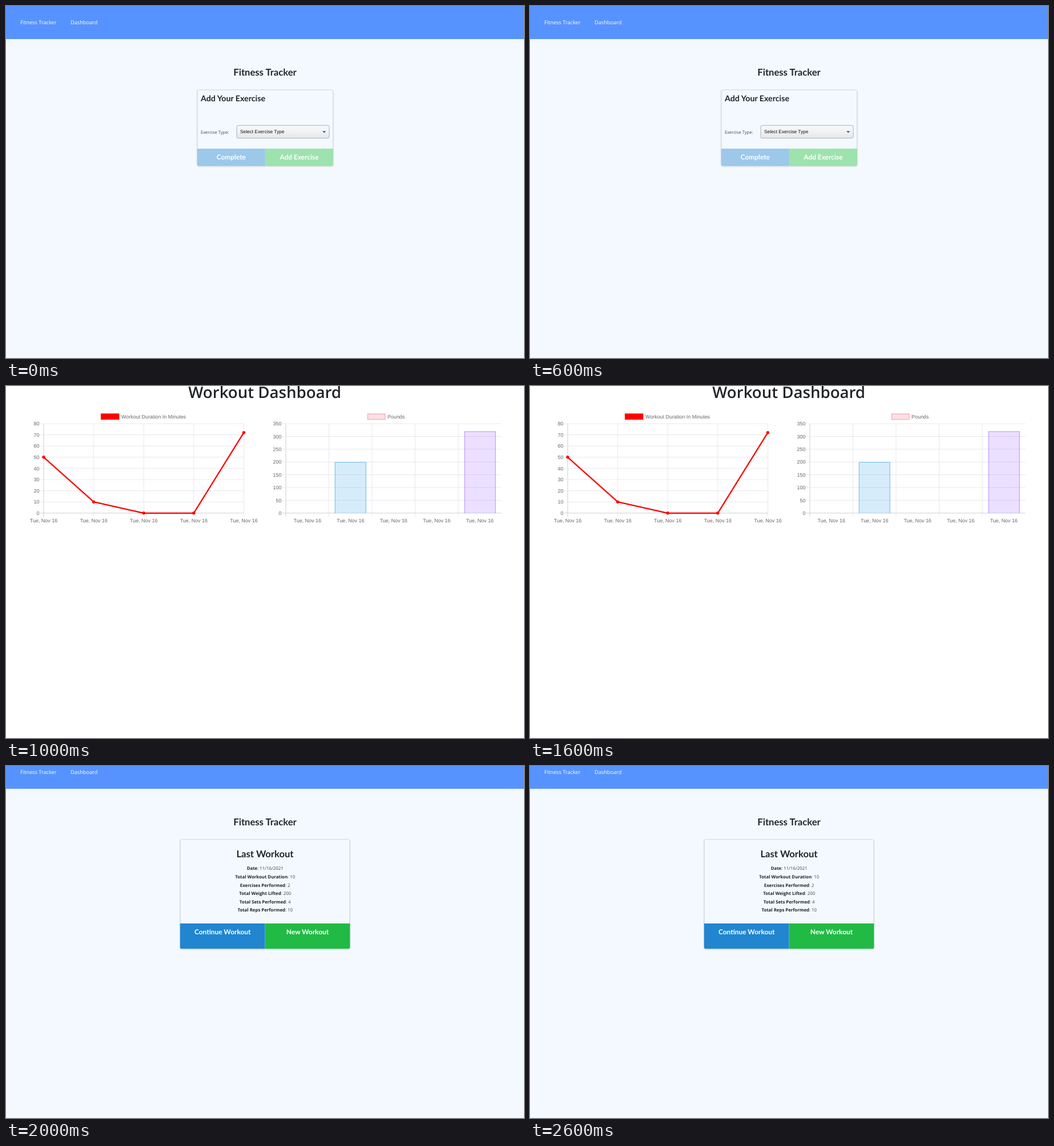
An HTML page that plays this animation: 907 by 617 pixels, repeating every 3 s.

```html
<!DOCTYPE html>
<html lang="en">
<head>
<meta charset="utf-8">
<title>Fitness Tracker</title>
<style>
html, body { margin: 0; width: 100%; height: 100%; overflow: hidden; background: #fff; }
svg { display: block; width: 907px; height: 617px; text-rendering: geometricPrecision; }
.scene { visibility: hidden; animation: show 3000ms step-end infinite; }
#charts { animation-delay: -2000ms; }
#summary { animation-delay: -1000ms; }
@keyframes show {
  0% { visibility: visible; }
  33.3333% { visibility: hidden; }
  100% { visibility: hidden; }
}
.ui { font-family: "Open Sans", "Noto Sans", sans-serif; }
.head { font-family: Lato, sans-serif; font-weight: 700; fill: #212529; }
.btn { font-family: Lato, sans-serif; font-weight: 700; font-size: 11.9px; fill: #fff; }
.nav { font-size: 9.2px; fill: #fff; }
.tick { font-family: "Liberation Sans", Arial, sans-serif; font-size: 8.95px; fill: #666; }
.mid { text-anchor: middle; }
.end { text-anchor: end; }
.card { fill: #f4f9ff; stroke: #d3d9e2; filter: drop-shadow(0 1px 1.2px rgba(34, 36, 38, .22)); }
</style>
</head>
<body>
<svg viewBox="0 0 907 617">
  <defs>
    <linearGradient id="face" x2="0" y2="1">
      <stop offset="0" stop-color="#f7f9fb"/>
      <stop offset=".45" stop-color="#f1f3f5"/>
      <stop offset="1" stop-color="#e5e6e8"/>
    </linearGradient>
  </defs>
  <g id="form" class="scene"></g>
  <g id="charts" class="scene"></g>
  <g id="summary" class="scene"></g>
</svg>
<script>
const NS = "http://www.w3.org/2000/svg";

function add(parent, tag, attrs, text) {
  const el = document.createElementNS(NS, tag);
  for (const key in attrs) el.setAttribute(key, attrs[key]);
  if (text !== undefined) el.textContent = text;
  return parent.appendChild(el);
}
const rect = (g, x, y, width, height, fill, more) =>
  add(g, "rect", { x, y, width, height, fill, ...more });
const label = (g, x, y, cls, text, size) =>
  add(g, "text", { x, y, class: cls, ...(size && { style: `font-size:${size}px` }) }, text);
const line = (g, x1, y1, x2, y2, stroke) =>
  add(g, "path", { d: `M${x1} ${y1}L${x2} ${y2}`, stroke, "stroke-width": 1 });

function page(g, navHeight) {
  rect(g, 0, 0, 907, 617, "#f4f9ff");
  rect(g, 0, 0, 907, navHeight, "#5793ff");
  label(g, 25, navHeight - 25.6, "ui nav", "Fitness Tracker");
  label(g, 113, navHeight - 25.6, "ui nav", "Dashboard");
  label(g, 453.5, navHeight + 64.2, "head mid", "Fitness Tracker", 16.6);
}

// Card with a two-button footer
function card(g, x, y, w, h, foot, buttons) {
  add(g, "rect", { x: x + .5, y: y + .5, width: w - 1, height: h - 1, rx: 2.5, class: "card" });
  const top = y + h - foot, bottom = y + h, mid = x + w / 2, right = x + w;
  const [left, other] = buttons;
  add(g, "path", { fill: left[1], d: `M${x} ${top}H${mid}V${bottom}H${x + 2.5}Q${x} ${bottom} ${x} ${bottom - 2.5}Z` });
  add(g, "path", { fill: other[1], d: `M${mid} ${top}H${right}V${bottom - 2.5}Q${right} ${bottom} ${right - 2.5} ${bottom}H${mid}Z` });
  label(g, x + w / 4, top + 18.9, "btn mid", left[0]);
  label(g, x + w * 3 / 4, top + 18.9, "btn mid", other[0]);
}

function drawForm(g) {
  page(g, 58);
  card(g, 334.7, 146.7, 238.3, 133.5, 30.2, [["Complete", "#9cc8ea"], ["Add Exercise", "#9de3ad"]]);
  label(g, 341, 167.4, "head", "Add Your Exercise", 14.2);
  add(g, "text", { x: 341, y: 223.8, class: "ui", fill: "#454a50", style: "font-size:7.6px" }, "Exercise Type:");
  rect(g, 404, 209.3, 162, 22.4, "url(#face)", { rx: 2.5, stroke: "#adb0b3" });
  add(g, "text", { x: 410, y: 223, class: "tick", style: "font-size:8.3px;fill:#111" }, "Select Exercise Type");
  add(g, "path", { d: "M554 219.2H560.4L557.2 222.6Z", fill: "#0b6cbd" });
}

const TOP = 66, BASE = 222.8, GRID = "#e7e8ee", AXIS = "#cfcfd3";

function axes(g, x0, x1, ticks, step, max, labelShift) {
  const gap = (x1 - x0) / (labelShift ? 5 : 4);
  for (let i = 0; i < 5; i++) {
    const x = x0 + i * gap;
    line(g, x, TOP, x, BASE + 6, i ? GRID : AXIS);
    label(g, x + labelShift * gap, 239.2, "tick mid", "Tue, Nov 16");
  }
  for (let i = 0; i <= ticks; i++) {
    const y = BASE - i * (BASE - TOP) / ticks;
    line(g, x0 - 6, y, x1, y, i ? GRID : AXIS);
    label(g, x0 - 7.6, y + 3.1, "tick end", i * step);
  }
  return value => BASE - value / max * (BASE - TOP);
}

function drawCharts(g) {
  rect(g, 0, 0, 907, 617, "#fff");
  add(g, "text", { x: 453.2, y: 21.4, class: "ui mid", fill: "#212529", "font-weight": 600, style: "font-size:27.6px" }, "Workout Dashboard");

  const minutes = axes(g, 66, 416.5, 8, 10, 80, 0);
  rect(g, 166, 48.2, 32.4, 10.8, "#f00");
  label(g, 202, 56.6, "tick", "Workout Duration In Minutes");
  const points = [50, 10, 0, 0, 72].map((v, i) => [66 + i * 87.6, minutes(v)]);
  add(g, "polyline", { points: points.join(" "), fill: "none", stroke: "#f00", "stroke-width": 2.3, "stroke-linejoin": "round" });
  for (const [cx, cy] of points) add(g, "circle", { cx, cy, r: 2.7, fill: "#f00" });

  const pounds = axes(g, 490, 867.3, 7, 50, 350, .5);
  rect(g, 633.3, 48.9, 30.6, 9.6, "#ffe0e6", { stroke: "#f3a6b6", "stroke-width": 1.2 });
  label(g, 668, 56.6, "tick", "Pounds");
  for (const [x, value, color] of [[576.2, 200, "54,162,235"], [803, 320, "153,102,255"]]) {
    const y = pounds(value) + .5;
    rect(g, x, y, 54, BASE - y, `rgba(${color},.2)`);
    add(g, "path", { d: `M${x} ${BASE}V${y}H${x + 54}V${BASE}`, fill: "none", stroke: `rgba(${color},.55)`, "stroke-width": 1.3 });
  }
}

function drawSummary(g) {
  page(g, 40);
  card(g, 304.8, 128.3, 297.5, 192, 44.4, [["Continue Workout", "#2185d0"], ["New Workout", "#21ba45"]]);
  label(g, 453.5, 160.2, "head mid", "Last Workout", 16.6);
  const stats = [
    ["Date", "11/16/2021"], ["Total Workout Duration", 10], ["Exercises Performed", 2],
    ["Total Weight Lifted", 200], ["Total Sets Performed", 4], ["Total Reps Performed", 10]
  ];
  stats.forEach(([name, value], i) => {
    const row = add(g, "text", { x: 453.7, y: 182.4 + i * 14.58, class: "ui mid", fill: "#3c4044", style: "font-size:7.8px" });
    add(row, "tspan", { "font-weight": 700, fill: "#212529" }, name);
    add(row, "tspan", {}, ": " + value);
  });
}

const scene = id => document.getElementById(id);
drawForm(scene("form"));
drawCharts(scene("charts"));
drawSummary(scene("summary"));
</script>
</body>
</html>
```
